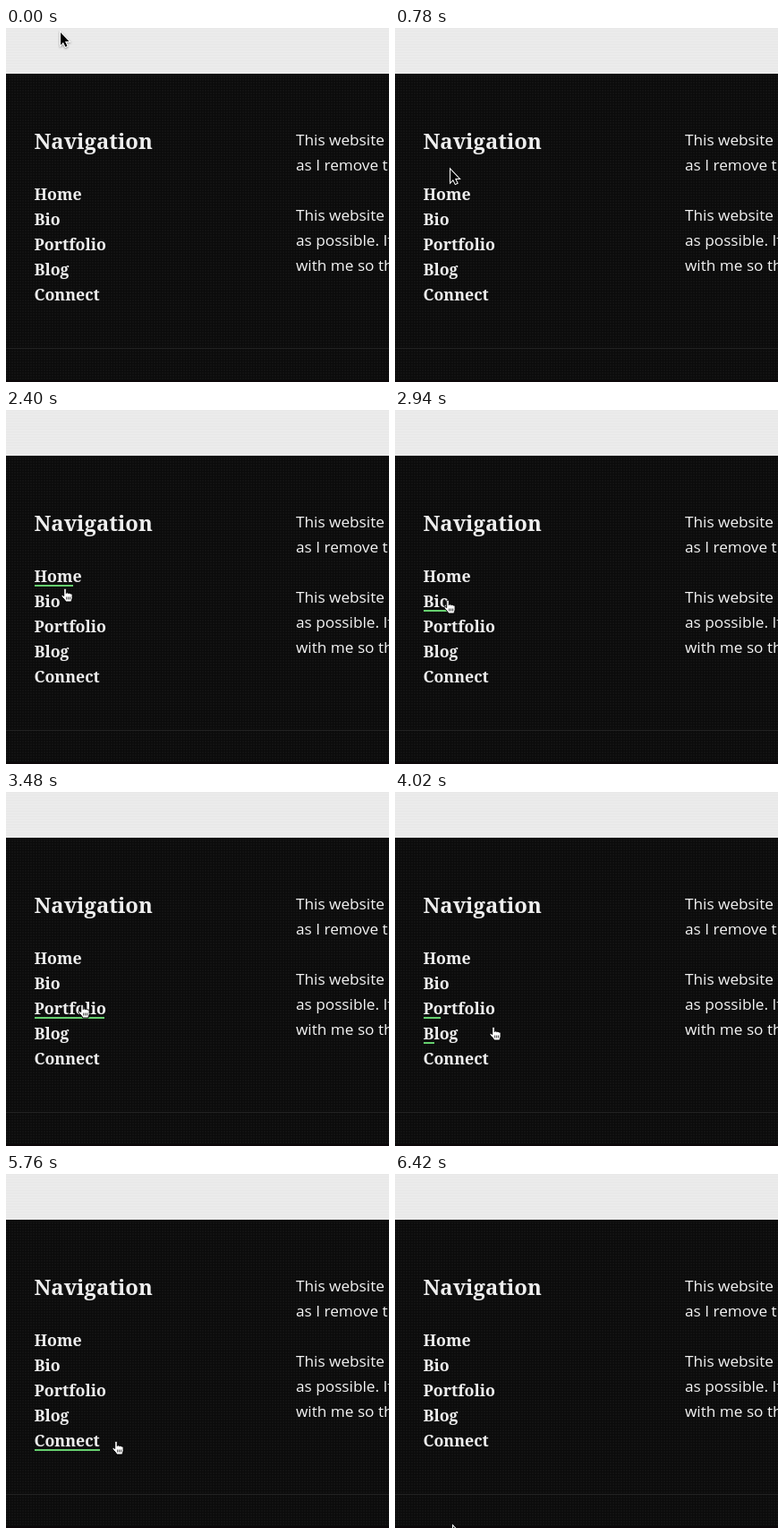
Recreate the animation shown at these times as an HTML page. Size 428 by 395 pixels, loop 6480 ms.

```html
<!DOCTYPE html>
<html lang="en">
<head>
<meta charset="utf-8">
<title>Footer navigation</title>
<style>
  html, body { margin: 0; width: 100%; height: 100%; overflow: hidden; background: #0e0e0e; }
  svg { display: block; }
  .nav { font: 700 17.8px "Noto Serif", serif; fill: #eee; }
  .nav .title { font-size: 23.9px; }
  .copy { font: 400 17.2px "Open Sans", sans-serif; fill: #f4f4f4; }
  #arrow { filter: drop-shadow(0 1px 1px #0006); }
</style>
</head>
<body>
<svg width="428" height="395" viewBox="0 0 428 395">
  <defs>
    <pattern id="dots" width="3" height="3" patternUnits="userSpaceOnUse">
      <rect width="3" height="3" fill="#0b0b0b"/>
      <rect width="2" height="2" fill="#121212"/>
    </pattern>
    <pattern id="lines" width="3" height="3" patternUnits="userSpaceOnUse">
      <rect width="3" height="3" fill="#ebebeb"/>
      <rect width="3" height="1" fill="#e8e8e8"/>
    </pattern>
  </defs>
  <rect width="428" height="395" fill="url(#dots)"/>
  <rect width="428" height="51" fill="url(#lines)"/>
  <rect y="357" width="428" height="1" fill="#222"/>
  <rect y="393" width="428" height="2" fill="#0c0709"/>

  <g class="nav" id="nav">
    <text class="title" x="31.5" y="135">Navigation</text>
  </g>
  <g class="copy">
    <text x="324" y="131">This website is</text>
    <text x="324" y="159">as I remove the</text>
    <text x="324" y="215">This website is</text>
    <text x="324" y="243">as possible. If</text>
    <text x="324" y="271">with me so that</text>
  </g>

  <g id="cursor">
    <path id="arrow" d="M1 1V15L4 12 6.500 17 8.500 16 6 11H10.500Z"
      fill="#000" stroke="#fff" stroke-width="2" paint-order="stroke"/>
    <g id="hand" transform="translate(-4.8 -.5)" stroke="#000">
      <path d="M3.500 9V1.800a1.300 1.300 0 0 1 2.600 0V6c.4-1 2.200-.9 2.500.2.5-.8 2-.6 2.300.5.6-.6 2-.2 2 1V11c0 1.500-1 2.300-1 4.500H5.500C5 13.500 2.500 11.500 1 9.500c-.8-1.300.8-2.200 2.500-.5z"
        fill="#fff"/>
      <path d="M6.500 10v3M8.500 10v3M10.500 10v3" stroke-width=".8"/>
    </g>
  </g>
</svg>
<script>
const LOOP = 6480, STEP = 60, FADE = 400, GAP = 100;
const labels = ["Home", "Bio", "Portfolio", "Blog", "Connect"];
// when each link is entered; the one before it is left GAP ms earlier
const enters = [980, 2440, 3160, 3936, 4744, 6105];
// pointer stops: arrival, departure, x, y
const stops = [
  [0, 0, 60, 4],
  [780, 780, 61, 157],
  [1320, 2100, 72, 186],
  [2700, 2940, 59, 212],
  [4020, 4020, 110, 262],
  [5000, 5940, 123, 298],
  [6420, LOOP, 64, 392]
];

const $ = id => document.getElementById(id);
const clamp = p => Math.min(1, Math.max(0, p));
const smooth = p => p * p * (3 - 2 * p);

function add(tag, attrs, text = "") {
  const el = document.createElementNS("http://www.w3.org/2000/svg", tag);
  for (const k in attrs) el.setAttribute(k, attrs[k]);
  el.textContent = text;
  return $("nav").appendChild(el);
}

const links = labels.map((label, i) => {
  const y = 192 + 28 * i;
  const text = add("text", { x: 31.5, y }, label);
  const bar = add("rect", { x: 32, y: y + 3, height: 2, fill: "#66d06f" });
  return { bar, width: text.getComputedTextLength() };
});

// CSS "ease": cubic-bezier(.25, .1, .25, 1), solved by bisection
function ease(p) {
  const bez = (a, b, s) => 3 * a * s * (1 - s) ** 2 + 3 * b * s * s * (1 - s) + s ** 3;
  let lo = 0, hi = 1;
  for (let i = 0; i < 20; i++) {
    const mid = (lo + hi) / 2;
    if (bez(.25, .25, mid) < clamp(p)) lo = mid; else hi = mid;
  }
  return bez(.1, 1, lo);
}

function pointer(t) {
  const i = Math.max(1, stops.findIndex(s => s[0] >= t));
  const [, depart, x0, y0] = t > stops.at(-1)[0] ? stops.at(-1) : stops[i - 1];
  const [arrive, , x1, y1] = t > stops.at(-1)[0] ? stops.at(-1) : stops[i];
  const k = smooth(clamp((t - depart) / (arrive - depart)));
  return [x0 + (x1 - x0) * k, y0 + (y1 - y0) * k];
}

function draw(now) {
  const t = Math.floor(now % LOOP / STEP) * STEP;
  links.forEach(({ bar, width }, i) => {
    const shown = ease((t - enters[i]) / FADE) - ease((t - enters[i + 1] + GAP) / FADE);
    bar.setAttribute("width", Math.round(width * shown));
  });
  const [x, y] = pointer(t).map(Math.round);
  const hovering = t >= enters[0] && t < enters.at(-1) - GAP;
  $("cursor").setAttribute("transform", `translate(${x} ${y})`);
  $("arrow").style.display = hovering ? "none" : "";
  $("hand").style.display = hovering ? "" : "none";
}

let start;
function tick(now) {
  start ??= now;
  draw(now - start);
  requestAnimationFrame(tick);
}
draw(0);
requestAnimationFrame(tick);
</script>
</body>
</html>
```
